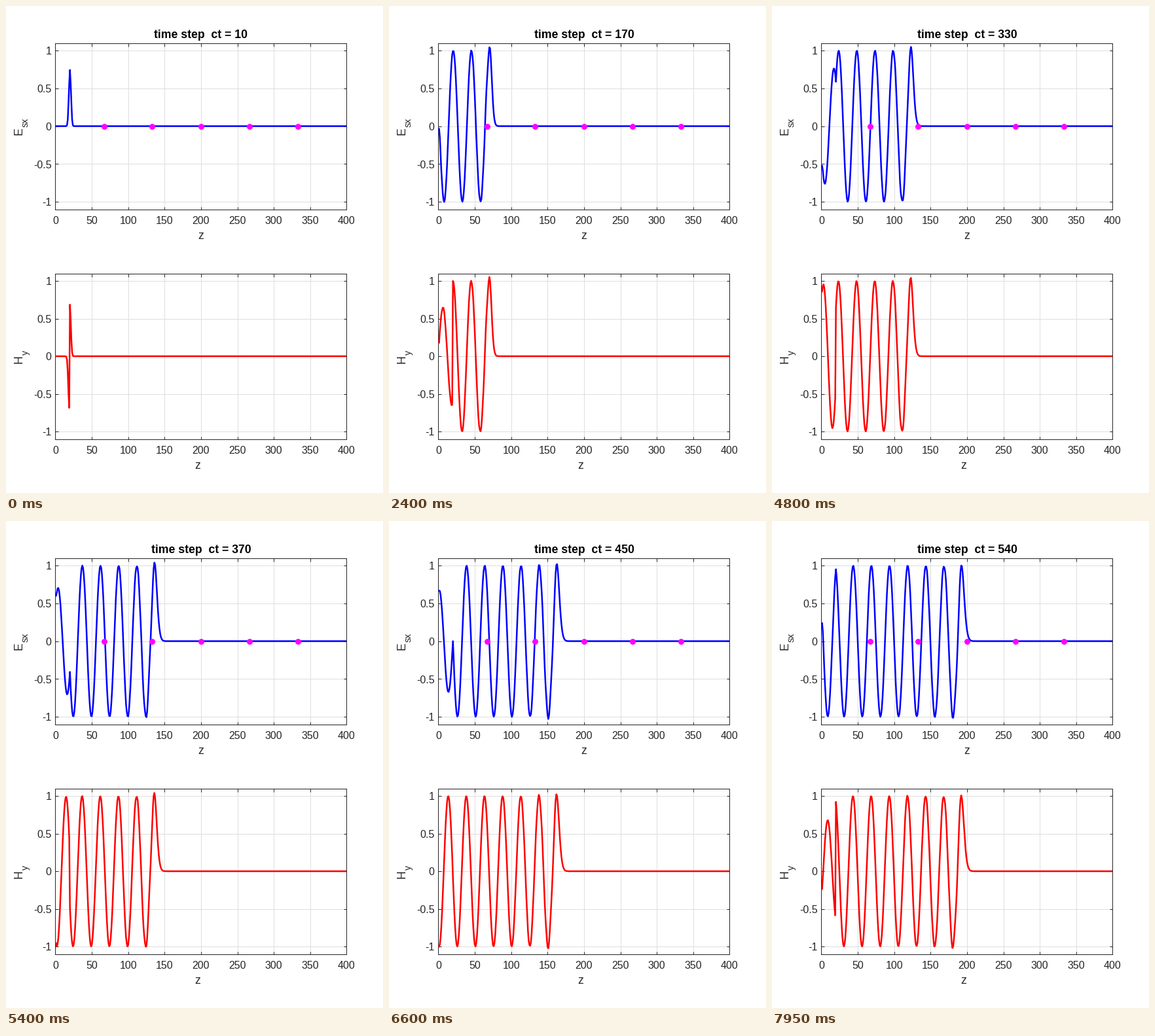
These frames come from a looping animation (576 by 744 pixels, 8 s). A matplotlib script:

```python
import numpy as np
import matplotlib.pyplot as plt
from matplotlib.animation import FuncAnimation

plt.rcParams["font.family"] = "Liberation Sans"

W, H, DPI = 576, 744, 96
PT = 72 / DPI                     # points per pixel
INK = "#262626"
CELLS, SOURCE, PERIOD, COURANT = 400, 20, 75, 1 / 3
STEPS, STRIDE = 540, 10
TICK_MS, HOLD = 50, 3             # each state is held for three ticks
LEFT, WIDTH = 75.45, 445


def simulate():
    """1-D FDTD wave with a hard sine source; returns (E, H) every STRIDE steps."""
    e = np.zeros(CELLS + 1)       # cell 0 is unused
    h = np.zeros(CELLS + 1)
    e_delay, h_delay = [0.0, 0.0], [0.0, 0.0]
    states = []
    for step in range(1, STEPS + 1):
        e[2:] += COURANT * (h[1:-1] - h[2:])
        e[SOURCE] = np.sin(2 * np.pi * step / PERIOD)
        e_delay.append(e[2])
        e[1] = e_delay.pop(0)
        h[1:-1] += COURANT * (e[1:-1] - e[2:])
        h_delay.append(h[2])
        h[1] = h_delay.pop(0)
        if step % STRIDE == 0:
            states.append((e[1:].copy(), h[1:].copy()))
    return states


def write(x, y, text, size=16, color=INK, **kw):
    """Text with its baseline at pixel (x, y), measured from the top left."""
    return fig.text(x / W, 1 - y / H, text, fontsize=size * PT, color=color,
                    va="baseline", **kw)


def side_label(y, main, sub, main_width):
    style = dict(rotation=90, rotation_mode="anchor", ha="left")
    write(25, y, main, 17.6, **style)
    write(34, y - main_width, sub, 14.1, **style)


def make_panel(top, height, color, z_x):
    bottom = top + height
    ax = fig.add_axes([LEFT / W, 1 - bottom / H, WIDTH / W, height / H])
    ax.set(xlim=(0, CELLS), ylim=(-1.1, 1.1))
    ax.set_xticks(range(0, CELLS + 1, 50))
    ax.set_yticks([-1, -0.5, 0, 0.5, 1])
    ax.set_axisbelow(True)
    ax.grid(color="#dedede", lw=PT)
    ax.tick_params(direction="in", length=4.5 * PT, width=PT, color=INK,
                   top=True, right=True, labelleft=False, labelbottom=False)
    for spine in ax.spines.values():
        spine.set(color=INK, linewidth=PT)
    for value in range(0, CELLS + 1, 50):
        write(LEFT + WIDTH * value / CELLS, bottom + 22.5, str(value), ha="center")
    for value in (-1, -0.5, 0, 0.5, 1):
        y = top + height * (1.1 - value) / 2.2
        write(69.5, y + 6.4, f"{value:g}", ha="right")
    write(z_x, bottom + 45, "z", 17.6, ha="center")
    line, = ax.plot([], [], color=color, lw=2.5 * PT, zorder=3)
    return ax, line


fig = plt.figure(figsize=(W / DPI, H / DPI), dpi=DPI, facecolor="white")
e_ax, e_line = make_panel(56.55, 254, "blue", 298)
h_ax, h_line = make_panel(408.55, 253, "red", 293)
side_label(197, "E", "sx", 11.9)
side_label(545.5, "H", "y", 12.8)
title = write(298, 49, "", 17.6, "black", weight="bold", ha="center")

probes = [round(CELLS * n / 6) for n in range(1, 6)]
e_ax.plot(probes, [0] * 5, "o", color="magenta", ms=9 * PT, mew=0, zorder=4)

cells = np.arange(1, CELLS + 1)
states = simulate()


def update(tick):
    index = tick // HOLD
    e, h = states[index]
    e_line.set_data(cells, e)
    h_line.set_data(cells, h)
    title.set_text(f"time step  ct = {(index + 1) * STRIDE}")
    return e_line, h_line, title


anim = FuncAnimation(fig, update, frames=160, interval=TICK_MS,
                     repeat=True, repeat_delay=0)
plt.show()
```
